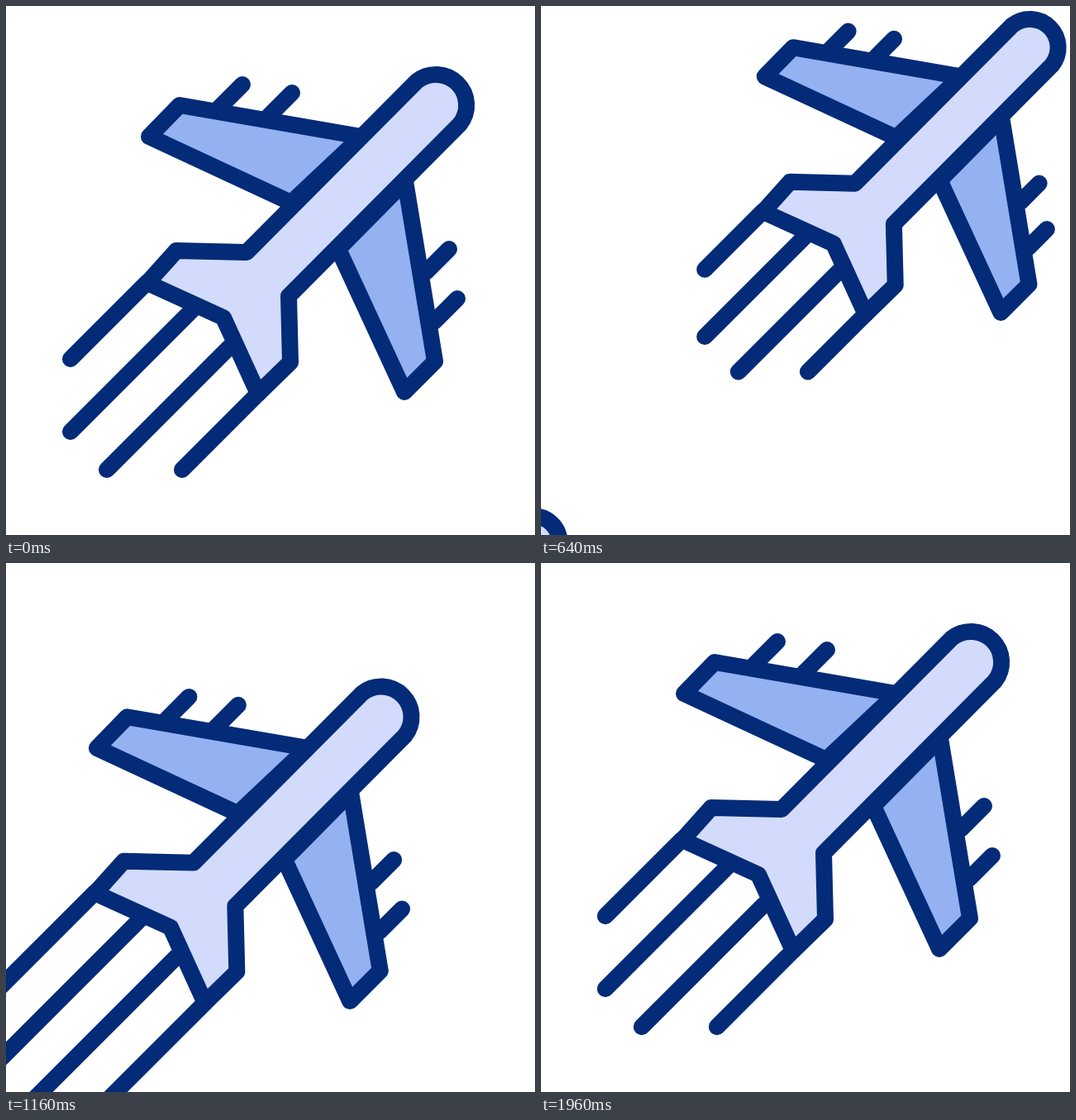
Write an HTML page with a canvas that moves like this. It is 640 px wide and 640 px high and loops after 2 s.

```html
<!DOCTYPE html>
<html lang="en">
<head>
<meta charset="utf-8">
<title>Plane loop</title>
<style>
  html, body { margin: 0; width: 100%; height: 100%; overflow: hidden; background: #fff; }
  canvas { display: block; width: 640px; height: 640px; }
</style>
</head>
<body>
<canvas id="stage" width="640" height="640"></canvas>
<script>
const ctx = document.getElementById('stage').getContext('2d');
const LOOP = 2000;
const CX = 319, CY = 320.5;
const NAVY = '#032b77', BODY = '#d2dbfb', WING = '#94b1f2';

const wings = new Path2D(
  'M430 158L210 120L173 158L345 238Z M483 212L519 430L482 467L402 294Z');
const body = new Path2D(
  'M497 91A37 37 0 0 1 549 143L342 351L344 431L305 469L263 377L171 335L206 296L291 298Z');

// Diagonal lines: free end x, y and the run to the plane
const trails = [[78, 427, 93], [78, 515, 149], [122, 561, 148], [213, 561, 92]];
const ticks = [[286, 95, -28], [346, 105, -28], [536, 294, -28], [546, 354, -28]];

const clamp = v => Math.min(1, Math.max(0, v));
const easeInOut = v => (1 - Math.cos(Math.PI * clamp(v))) / 2;

// Free ends slide along the diagonal by pull.
function diagonals(lines, pull) {
  ctx.beginPath();
  for (const [x, y, run] of lines) {
    ctx.moveTo(x + pull, y - pull);
    ctx.lineTo(x + run, y - run);
  }
  ctx.stroke();
}

function plane(dx, dy, shrink, trailPull) {
  const scale = 1 - shrink;
  ctx.save();
  ctx.translate(CX + dx, CY + dy);
  ctx.scale(scale, scale);
  ctx.translate(-CX, -CY);
  ctx.lineWidth = 20 / scale; // outline keeps its weight
  diagonals(trails, trailPull);
  diagonals(ticks, -50 * shrink);
  for (const [shape, fill] of [[wings, WING], [body, BODY]]) {
    ctx.fillStyle = fill;
    ctx.fill(shape);
    ctx.stroke(shape);
  }
  ctx.restore();
}

function leave(t) {
  const run = Math.max(0, (t - 67) / 933) ** 3;
  const shrink = 0.163 * easeInOut((t - 120) / 1090);
  plane(372 * run, -365 * run, shrink, 217 * shrink);
}

function enter(t) {
  const left = (LOOP - t) / 1000;
  const rest = (left * (4.61 + 0.345 * left ** 4.1)) ** 3;
  plane(-rest, rest, 0.026 * left ** 6, -3 * rest ** 0.57);
}

function draw(t) {
  ctx.fillStyle = '#fff';
  ctx.fillRect(0, 0, 640, 640);
  ctx.strokeStyle = NAVY;
  ctx.lineCap = ctx.lineJoin = 'round';
  if (t < 1300) leave(t);
  if (t > 520) enter(t);
}

const start = performance.now();
function tick() {
  draw((performance.now() - start) % LOOP);
  requestAnimationFrame(tick);
}
tick();
</script>
</body>
</html>
```
